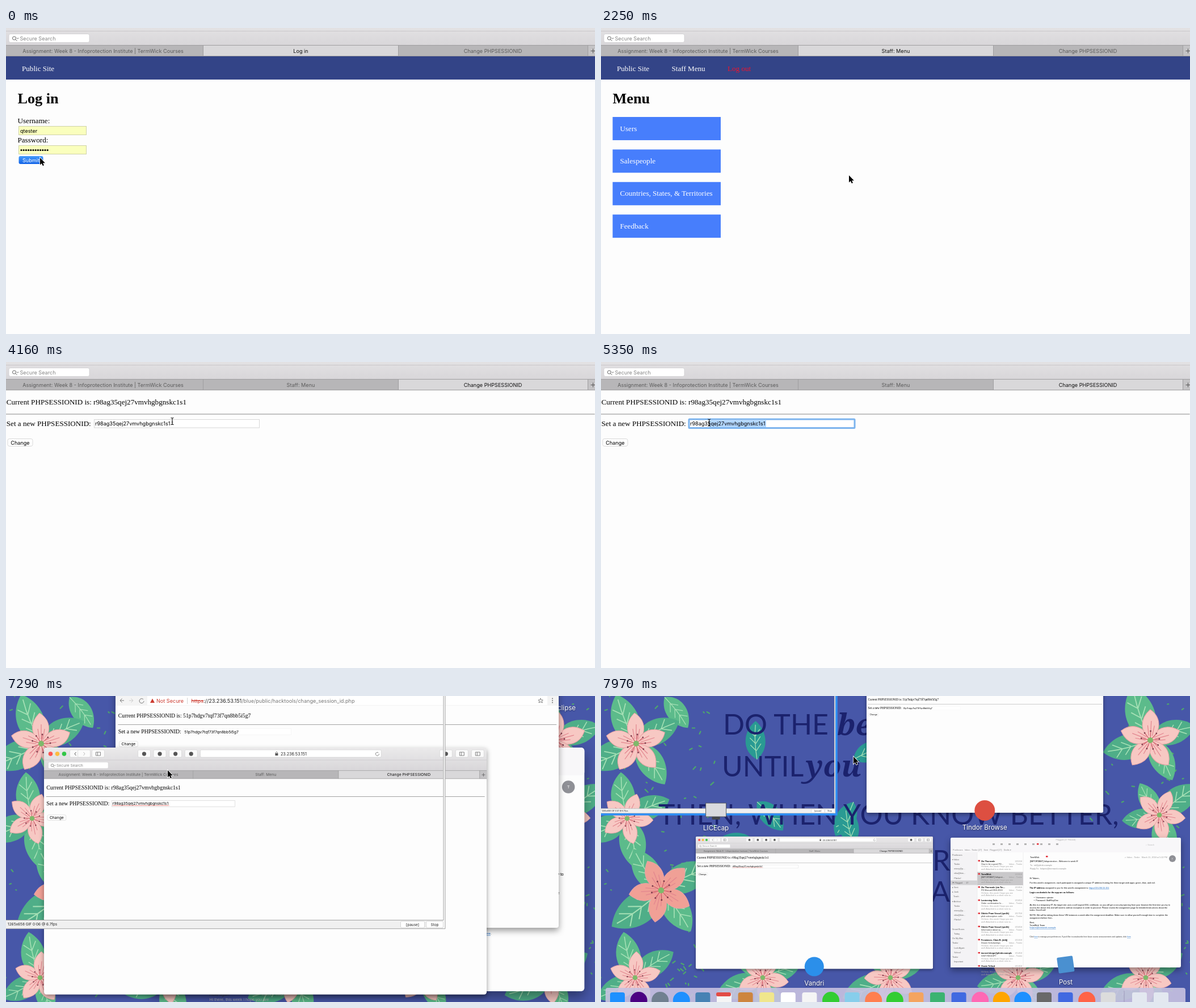
Write an HTML page that moves like this. It is 1038 px wide and 540 px high and loops after 8 s.

```html
<!DOCTYPE html>
<html lang="en">
<head>
<meta charset="utf-8">
<title>Session ID demo</title>
<style>
  html, body { margin: 0; width: 100%; height: 100%; overflow: hidden; background: #fdfdfd; }
  svg { display: block; width: 100vw; height: 100vh; }
  text { white-space: pre; }
  .serif { font: 13.12px "Liberation Serif", serif; }
  .h1 { font: bold 26.24px "Liberation Serif", serif; }
  .ui { font: 9.1px Inter, sans-serif; }
  .tiny { font: 3.75px "Liberation Sans", sans-serif; }
  .small { font: 6.5px Inter, sans-serif; }
  .label { font: 11.5px Inter, sans-serif; filter: drop-shadow(0 1px 1px #0008); }
  .letter { font: 50px Lato, sans-serif; }
  .script { font: italic bold 52px "Noto Serif", serif; }
  .shadow { filter: drop-shadow(0 5px 6px #0006); }
  .mid { text-anchor: middle; }
  .end { text-anchor: end; }
  .bold { font-weight: bold; }
  .link { fill: #1565c0; text-decoration: underline; }
</style>
</head>
<body>
<svg id="stage" viewBox="0 0 1038 540"></svg>
<script>
const LOOP = 8000;
const SESSION = 'r98ag35qej27vmvhgbgnskc1s1';

const times = (n, make) => Array.from({ length: n }, (_, i) => make(i)).join('');
const rect = (x, y, w, h, fill, more = '') =>
  `<rect x="${x}" y="${y}" width="${w}" height="${h}" fill="${fill}" ${more}/>`;
const circle = (x, y, r, fill, more = '') => `<circle cx="${x}" cy="${y}" r="${r}" fill="${fill}" ${more}/>`;
const line = (d, stroke, width = 1, more = '') =>
  `<path d="${d}" fill="none" stroke="${stroke}" stroke-width="${width}" ${more}/>`;
const text = (x, y, cls, str, fill = '#000', more = '') =>
  `<text x="${x}" y="${y}" class="${cls}" fill="${fill}" ${more}>${str}</text>`;
const group = (id, body, more = '') => `<g id="${id}" ${more}>${body}</g>`;
const link = str => `<tspan class="link">${str}</tspan>`;
const bold = str => `<tspan class="bold">${str}</tspan>`;

// ---------- browser pages ----------
const header = title => rect(0, 50, 1042, 41, '#334487') +
  text(28, 75.5, 'serif', 'Public Site', '#fff') + text(20.5, 132.5, 'h1', title);
const loginField = (y, label) => text(20.5, y, 'serif', label) +
  rect(22.5, y + 5.5, 119, 15, '#faffbd', 'stroke="#cfd2a8"');

const loginPage = header('Log in') +
  loginField(168, 'Username:') + text(25, 184.5, 'ui', 'qtester') +
  loginField(202, 'Password:') + times(12, i => circle(27 + i * 4.2, 215.5, 1.6, '#000')) +
  rect(22.5, 226, 43, 14, 'url(#blue)', 'id="submit" rx="3"') + text(44, 236.5, 'ui mid', 'Submit', '#fff');

const menuPage = header('Menu') +
  text(124.5, 75.5, 'serif', 'Staff Menu', '#fff') + text(223, 75.5, 'serif', 'Log out', '#f0142d') +
  ['Users', 'Salespeople', 'Countries, States, &amp; Territories', 'Feedback'].map((label, i) =>
    rect(20.5, 157 + i * 57.4, 190.5, 41, '#477efc') +
    text(33.5, 181.5 + i * 57.4, 'serif', label, '#fff')).join('');

const sessionPage = (id, inputWidth, inputBorder, buttonY, inputExtras = '') =>
  text(0.8, 74.8, 'serif', 'Current PHPSESSIONID is: ' + id) +
  rect(0, 91.5, 1037.5, 1, '#858585') +
  text(0.8, 112.5, 'serif', 'Set a new PHPSESSIONID:') +
  rect(155.5, 101.5, inputWidth, 14.5, '#fff', `stroke="${inputBorder}"`) + inputExtras +
  text(157, 112.2, 'ui', id) +
  rect(3, buttonY, 44, 13, '#fff', 'rx="3" stroke="#d0d0d0" stroke-width=".8"') +
  text(25, buttonY + 10, 'ui mid', 'Change');

const inputExtras =
  rect(155, 101, 292, 15.5, 'none', 'id="ring" rx="1" stroke="#7db4ee" stroke-width="3"') +
  rect(157, 103, 0, 12, '#b3d7ff', 'id="selection"');

const tabs = rect(-5, 30, 1047, 20, '#b7b6b8') +
  rect(348, 30, 344, 20, '#d9d8da', 'id="activeTab"') + rect(1025.5, 30, 17, 20, '#c4c3c5') +
  line('M-5 30.5H1042M-5 49.5H1042M347.5 30V50M691.5 30V50M1025.5 30V50', '#9f9ea0') +
  text(171, 43.5, 'ui mid', 'Assignment: Week 8 - Infoprotection Institute | TermWick Courses', '#5c5c5c') +
  text(519.5, 43.5, 'ui mid', '', '#111', 'id="tab1"') +
  text(858, 43.5, 'ui mid', 'Change PHPSESSIONID', '#5c5c5c', 'id="tab2"') +
  line('M1030.5 40.5H1038.5M1034.5 36.5V44.5', '#555');

const toolButton = (x, glyph) =>
  rect(x - 11, 95, 22, 13, '#fbfbfb', 'rx="2" stroke="#cfcfcf" stroke-width=".6"') + glyph;
const dot = x => circle(x, 102, 3.6, '#555');
const box = x => line(`M${x - 4} 99h8v6h-8zm3 0v6`, '#666', .8);
const toolbar = `<g transform="translate(-95.6 -146) scale(1.342)">` +
  ['#fc5753', '#fdbc40', '#33c748'].map((color, i) => circle(79 + i * 12, 102, 3.8, color)).join('') +
  toolButton(124, line('M124 99l-2.5 3l2.5 3', '#555')) + toolButton(138, line('M137 99l2.5 3l-2.5 3', '#bbb')) +
  toolButton(163, box(163)) + times(4, i => toolButton(244 + i * 27.6, dot(244 + i * 27.6))) +
  toolButton(776, dot(776)) + toolButton(804, box(804)) + toolButton(832, box(832)) +
  rect(343, 95, 319, 13, '#fff', 'rx="2" stroke="#ccc" stroke-width=".6"') +
  rect(475, 101, 5, 4, '#555') + line('M476 101v-1.5q1.5 -2.5 3 0v1.5', '#555', .8) +
  text(507.5, 105, 'mid', '23.236.53.151', '#222', 'style="font:7.2px Inter,sans-serif"') +
  line('M657 100a3 3 0 1 0 1 2', '#666', .8) + `</g>`;

const webWindow = rect(-5, -24, 1047, 585, '#fdfdfd', 'rx="6"') +
  `<path d="M-5 30V-18Q-5 -24 1 -24H1036Q1042 -24 1042 -18V30Z" fill="url(#barGrey)"/>` + toolbar +
  line('M-5 5.5H1042', '#c9c7ca') +
  rect(5, 10.5, 142, 15, '#fff', 'rx="3" stroke="#d0ced1" stroke-width=".8"') +
  circle(14.5, 18, 3, 'none', 'stroke="#666"') + line('M16.7 20.2l2.8 2.8M19 17.5l1.7 1.5l1.7 -1.5', '#666') +
  text(24.5, 22, 'ui', 'Secure Search', '#868686') + tabs +
  group('login', loginPage) + group('menu', menuPage) +
  group('session', sessionPage(SESSION, 291, '#d8d8d8', 135.5, inputExtras) +
    line('M157 113.2H291', '#ea4b43', 1.4, 'id="squiggle" stroke-dasharray="2 1.1"'));

// ---------- other windows ----------
const urlLine = text(265, 11.5, 'ui', '<tspan fill="#cc3b30">Not Secure</tspan>' +
  '<tspan fill="#bbb">  |  </tspan><tspan fill="#cc3b30" text-decoration="line-through">https</tspan>' +
  '://23.236.53.151<tspan fill="#777">/blue/public/hacktools/change_session_id.php</tspan>', '#222');
const secondWindow = rect(193, -60, 781, 469, '#fdfdfd', 'rx="4"') + rect(193, -60, 781, 77, '#f4f4f4') +
  rect(249, 0, 705, 16, '#fff') +
  line('M208 8h-7l3.5 -3.5m-3.5 3.5l3.5 3.5M242 6a4 4 0 1 0 1 3', '#777') +
  line('M217 8h7l-3.5 -3.5m3.5 3.5l-3.5 3.5', '#ccc') +
  `<path d="M254 12l4 -7.5l4 7.5z" fill="#cc3b30"/>` + urlLine +
  line('M942 4l1.3 3h3l-2 2l1 3l-3.3 -1.8l-3 1.8l1 -3l-2 -2h2.700z', '#666', .8) +
  times(3, i => circle(963, 4.5 + i * 3.5, .9, '#666')) +
  `<g transform="translate(197.25 -18) scale(.745)">` +
  sessionPage('51p7hdgv7tqf73f7qn8bb5i5g7', 254, '#f4f4f4', 131.5) + `</g>`;

const accounts = ['   Tindor', '   minny@p…', '   nika@bim…', '   Plimbo!'];
const folders = ['Postboxes', '▾ Inbox', ...accounts, '⚑ Flagged      17', '▸ Sent', '▸ Junk', '  Trash',
  '▾ Archive', ...accounts, '', 'Smart Boxes', '   Today', 'On My Mac', 'Tindor', '   Look Again', '   School',
  'Tindor', '   Important'];
const senders = [['Zia Thornvale', 'How to be a good PD…'], ['TermWick', '[IMPORTANT] Infoprot…'],
  ['Zia Thornvale (via Tin…', 'PD Manual 2018-2019'], ['Lanterning Gala', 'Order confirmation fo…'],
  ['Odette Pram Vossel (qrn2k)', 'pfub subscription code'], ['Odette Pram Vossel (qrn2k)', 'Information about su…'],
  ['Fennimore, Clara B. (zk4j)', 'Dearm Scholarships'], ['tavneel.dorga@plimb.example', 'VISIT RECEIPT'],
  ['Oswin Tellard', 'Hello again']];
const letter = ['Hi Talwen,', '',
  "For this week's assignment, each participant is assigned a unique IP address hosting the three target web apps: green, blue, and red.", '',
  `${bold('The IP address')} assigned to you for this week's assignment is: ${link('https://23.236.53.151')}`, '',
  bold('Login credentials for the app are as follows:'), '',
  '       •  Username: qtester', '       •  Password: StaffKeyOne', '',
  'As this is a temporary IP, the target site uses a self-signed SSL certificate, so you will get a security warning from your browser the first time you try to',
  'access the above link and will need to add an exception in order to proceed. Please review the assignment page for detailed instructions about the',
  'tasks. Good luck!', '',
  'NOTE: We will be taking down these VM instances a week after the assignment deadline. Make sure to allow yourself enough time to complete the',
  'assignment before then.', '', 'Best,', 'TermWick Team', link('helpers@termwick.example')];
const flag = (x, y) => rect(x, y, 3.5, 2.5, '#e3303a');

let letterY = 318;
const letterBody = letter.map(s => text(755.5, letterY += s ? 4.6 : 4, 'tiny', s)).join('');

const message = ([name, subject], i) => {
  const y = 292.5 + i * 23.2;
  return flag(664.5, y - 3) + text(670, y, 'tiny bold', name) + text(670, y + 5, 'tiny', subject, '#333') +
    text(670, y + 9.8, 'tiny', 'Hi there, this week I hope you are', '#999') +
    text(670, y + 14.5, 'tiny', 'well. Attached is a short note to…', '#999') +
    text(742, y, 'tiny end', `3/${21 - i}/18`, '#999') + text(742, y + 5, 'tiny end', 'Inbox - Tindor', '#999');
};
const letterWindow = rect(616, 250, 406, 229, '#fdfdfd', 'rx="3"') + rect(616, 250, 406, 26, '#f8f7f9', 'rx="3"') +
  text(819, 255, 'tiny mid', 'Flagged (17 Filtered)', '#aaa') +
  times(9, i => rect(690 + i * 14, 260, 4, 3, '#b5b5b5')) + flag(768, 260) +
  text(960, 264, 'tiny', '⌕ Search', '#bbb') +
  text(620, 273, 'tiny', 'Postboxes   Inbox - Tindor (27)   Sent   Flagged (17)   Drafts ▾', '#888') +
  rect(616, 276, 47, 203, '#f4f3f5') + rect(616, 325.5, 47, 8, '#d2d1d4') +
  folders.map((name, i) => text(619, 281.5 + i * 8.2, 'tiny', name, '#666')).join('') +
  rect(663, 310.5, 81, 23.5, '#c9c8ca') + line('M744 276V479M663 276V479', '#e2e2e2', .5) +
  senders.map(message).join('') +
  text(756, 285.5, 'tiny', 'TermWick') + flag(784, 282) +
  text(756, 292.5, 'tiny', '[IMPORTANT] Infoprotection - Welcome to week 8!') +
  text(756, 299.5, 'tiny', 'To:  tal@plimb.example', '#888') +
  text(756, 306, 'tiny', 'Reply-To:  helpers@termwick.example', '#888') +
  text(998, 285.5, 'tiny end', '▱ Inbox - Tindor   March 21, 2018 at 5:22 PM', '#999') +
  circle(1007, 287, 6, '#8f9096') + text(1007, 288.5, 'tiny mid', 'T', '#fff') + letterBody +
  text(755.5, 426, 'tiny', `Click ${link('here')} to manage post preferences. If you'd like to unsubscribe from future course announcements and updates, click ${link('here')}.`, '#333', 'style="font-size:3.2px"');

const smallButton = (x, w, label) =>
  rect(x, 397.5, w, 11.5, '#fff', 'rx="2" stroke="#c8c8c8" stroke-width=".7"') +
  text(x + w / 2, 405.5, 'small mid', label, '#222');
const recorder = line('M-40 414H777V-60', '#2f90f6', 8, 'id="highlight"') +
  rect(-40, 395, 814, 16, '#f0f0f0') + rect(770.5, -60, 3.5, 471, '#fafafa') +
  line('M-40 395.5H771V-60M-40 410.7H774V-60', '#9a9a9a', .9) +
  text(3, 405, 'small', '', '#222', 'id="counter"') +
  smallButton(695.5, 42, '[pause]') + smallButton(740.5, 30, 'Stop');

// ---------- wallpaper ----------
let seed = 7;
const random = () => (seed = seed * 16807 % 2147483647) / 2147483647;
const spin = (n, body) => times(n, i => `<g transform="rotate(${i * 360 / n})">${body}</g>`);

const defs = `<defs>
  <linearGradient id="blue" x2="0" y2="1"><stop stop-color="#459bfc"/><stop offset="1" stop-color="#1263e6"/></linearGradient>
  <linearGradient id="barGrey" x2="0" y2="1"><stop stop-color="#ebeaeb"/><stop offset="1" stop-color="#d8d6d9"/></linearGradient>
  <g id="flower">${spin(5, '<path d="M0 0C-19 -16 -21 -36 -3 -54C17 -42 20 -18 0 0" stroke="#e9a3a5"/>' +
    line('M0 -8V-34M-3 -8l-3 -18M3 -8l3 -18', '#e2868f', 1.2))}
    ${spin(9, line('M0 0l2 -15', '#c9525f') + circle(2, -16, 1.4, '#7b3b4a'))}${circle(0, 0, 5, '#7fb96b')}</g>
  <g id="leaf"><path d="M0 0C-30 -18 -26 -60 4 -80C26 -58 28 -20 0 0"/>
    ${line('M0 0Q-3 -40 3 -72' + times(3, i => `M0 ${-18 - i * 15}l-11 -13m11 13l11 -14`), '#a5e0b5', 1.5)}</g></defs>`;
const stamp = (shape, x, y, turn, scale, fill) =>
  `<use href="#${shape}" fill="${fill}" transform="translate(${x} ${y}) rotate(${turn}) scale(${scale})"/>`;

const PINK = '#f7c8c3', CORAL = '#f0a096';
const sideFlowers = [[62, 84, 1, PINK], [46, 216, .85, PINK], [106, 343, 1.05, CORAL]];
const flowers = [...sideFlowers, ...sideFlowers.map(([x, y, s, c]) => [1030 - x, y - 6, s, c])];
for (let x = 60; x < 1038; x += 225) flowers.push([x, 497, .85, PINK]);

const leavesAround = ([x, y, size]) => times(4, i =>
  stamp('leaf', x, y, 50 + i * 90 + random() * 30, size * (.95 + random() * .4), i % 2 ? '#5cbb8b' : '#4fae88'));
const specks = times(150, i =>
  `M${random() * 200 + (i % 2) * 850} ${random() * 540}l${random() * 10 - 5} ${random() * 10 - 5}`);

const wallpaper = rect(0, 0, 1038, 540, '#4757a8') +
  line(specks, '#4da86b', 2.2, 'stroke-linecap="round"') +
  times(8, i => stamp('leaf', 275 + (i % 2) * 170, 112 + (i >> 1) * 75, i * 70 - 5, .85, '#2a9a93')) +
  stamp('leaf', 112, 2, 140, .85, '#5cbb8b') + flowers.map(leavesAround).join('') +
  flowers.map(([x, y, size, color], i) => stamp('flower', x, y, i * 25, size, color)).join('') +
  `<g fill="#1b226d">` +
  [['letter', 215, 68, 'DO THE'], ['script', 416, 69, 'best'], ['letter', 213, 142, 'UNTIL'], ['script', 361, 142, 'you'],
    ['letter', 101, 227, 'THEN, WHEN YOU KNOW BETTER,'], ['letter', 584, 308, 'R'], ['letter', 581, 363, 'A']]
    .map(([cls, x, y, str]) => text(x, y, cls, str, 'inherit')).join('') + `</g>`;

// ---------- dock; a star marks a round icon ----------
const dockIcons = ('dodgerblue indigo* slategray* dodgerblue* steelblue whitesmoke peru khaki white whitesmoke limegreen* ' +
  'skyblue coral* limegreen* sandybrown mediumseagreen royalblue hotpink* orange* dodgerblue* dimgray royalblue tomato* ' +
  'gainsboro').split(' ');
const dock = rect(8, 515, 1022, 60, '#c8c3e2', 'rx="4" opacity=".9"') + line('M922 520V540', '#9b97b8') +
  dockIcons.map((icon, i) => {
    const x = 29 + i * 37.6, color = icon.replace('*', '');
    return icon.endsWith('*') ? circle(x, 537, 15, color) : rect(x - 13, 523, 26, 28, color, 'rx="4"');
  }).join('') + times(2, i => rect(936 + i * 38, 523, 26, 28, '#e3e8f0', 'rx="3"')) +
  rect(203, 523, 26, 7, '#e24b45', 'rx="3"');

// ---------- overview windows ----------
// anchor: point inside the window; from / to: [x, y, scale] of that point; foot: where the app badge sits.
const windows = {
  letterWin: { anchor: [616, 250], from: [257, 91, 1.8776], to: [616, 250, 1], foot: [819, 479],
    name: 'Post', icon: rect(-14, -15, 28, 28, '#4a90d0', 'rx="2" transform="rotate(-8)"') },
  secondWin: { anchor: [193, 409], from: [193, 409, 1], to: [468, 206, .534], foot: [583, 409],
    name: 'Tindor Browse', icon: circle(0, 0, 18, '#dd4f41') },
  webWin: { anchor: [-5, -24], from: [67, 91, .745], to: [167, 248, .3992], foot: [518, 561],
    name: 'Vandri', icon: circle(0, 0, 17, '#2b8fea') },
  recorderWin: { anchor: [774, 411], from: [774, 411, 1], to: [413, 207, .534], foot: [380, 411],
    name: 'LICEcap', icon: rect(-18, -14, 36, 24, '#d9dade', 'stroke="#55585e"') + rect(-7, 10, 14, 5, '#44474c') }
};
const badges = Object.entries(windows).map(([id, { name, icon }]) =>
  group(id + 'Badge', icon + text(0, 33.5, 'label mid', name, '#fff'))).join('');

document.getElementById('stage').innerHTML = defs +
  group('desk', wallpaper + text(972, 25, 'label', 'clipse', '#fff', 'id="desktopLabel"') +
    group('letterWin', letterWindow, 'class="shadow"') + group('secondWin', secondWindow, 'class="shadow"')) +
  group('webWin', webWindow) +
  group('front', group('recorderWin', recorder) + group('overlay', group('dock', dock) + badges)) +
  group('arrow', '<path d="M0 0V12.600l2.900 -2.700l2 4.300l2 -.9l-1.900 -4.100h3.900z" stroke="#fff" stroke-width="1.600" paint-order="stroke"/>') +
  group('beam', line('M-2.5 -6Q0 -6 0 -4.5V4.5Q0 6 -2.5 6M2.5 -6Q0 -6 0 -4.5M0 4.5Q0 6 2.5 6M-1.2 1.5H1.2', '#111', 1.1));

// ---------- motion ----------
const STEP = 147, OVERVIEW = 7290;
const $ = id => document.getElementById(id);
const show = (id, on) => $(id).style.display = on ? '' : 'none';
const mix = (a, b, p) => a.map((v, i) => v + (b[i] - v) * p);

// Pointer journeys: first change, last change, destination.
const journeys = [
  [0, 0, [60, 229]], [150, 470, [300, 299]],
  [1370, 1810, [243, 82]], [1957, 2250, [437, 260]],
  [2550, 3433, [694, 38]],
  [3720, 3867, [310, 157]], [4015, 4160, [293, 104.5]],
  [4610, 4760, [318, 107]], [4907, 5650, [127, 107]],
  [5950, 6100, [292, 154]],
  [OVERVIEW, OVERVIEW, [285, 131]], [7430, 7430, [278, 105]], [7610, 7970, [445, 107]]];

function pointerAt(t) {
  const i = journeys.findLastIndex(([start]) => t >= start);
  const [start, end, goal] = journeys[i];
  const steps = Math.round((end - start) / STEP);
  const p = Math.min(1, (Math.floor((t - start + 8) / STEP) + 1) / (steps + 1));
  return mix(journeys[Math.max(0, i - 1)][2], goal, p);
}

function drawOverview(t) {
  const shown = Math.floor((t - OVERVIEW) / 140) * 140;
  const p = 1 - (1 - Math.min(1, shown / 233)) ** 2;
  for (const [id, { anchor, from, to, foot }] of Object.entries(windows)) {
    const [x, y, scale] = mix(from, to, p);
    $(id).setAttribute('transform', `translate(${x} ${y}) scale(${scale}) translate(${-anchor[0]} ${-anchor[1]})`);
    const badge = $(id + 'Badge');
    badge.setAttribute('transform',
      `translate(${x + (foot[0] - anchor[0]) * scale} ${y + (foot[1] - anchor[1]) * scale - 4})`);
    badge.lastChild.setAttribute('opacity', Math.max(0, (p - .7) / .3));
  }
  show('overlay', p > .5);
  show('desktopLabel', p < .5);
  show('highlight', t >= 7790);
  $('dock').setAttribute('transform', `translate(0 ${25 * (1 - p)})`);
  $('counter').textContent = `1265x658 GIF 0:0${p < .5 ? 6 : 7} @ 6.7fps`;
}

function drawBrowser(t, pointerX) {
  const loggedIn = t >= 305, onSession = t >= 3425, focused = t >= 4302 && t < 6400;
  show('login', !loggedIn);
  show('menu', loggedIn && !onSession);
  show('session', onSession);
  $('submit').style.filter = t >= 150 ? 'brightness(.8)' : '';
  $('tab1').textContent = loggedIn ? 'Staff: Menu' : 'Log in';
  $('tab1').setAttribute('fill', onSession ? '#5c5c5c' : '#111');
  $('tab2').setAttribute('fill', onSession ? '#111' : '#5c5c5c');
  $('activeTab').setAttribute('x', onSession ? 692 : 348);
  $('activeTab').setAttribute('width', onSession ? 333 : 344);
  show('ring', focused);
  show('squiggle', t >= 6540);
  show('selection', focused && t >= 4907);
  const left = t < 5650 ? Math.min(291, Math.max(157, pointerX)) : 157;
  $('selection').setAttribute('x', left);
  $('selection').setAttribute('width', 291 - left);
}

function draw(t) {
  const inOverview = t >= OVERVIEW, typing = t >= 4152 && t < 5950;
  const [x, y] = pointerAt(t);
  show('desk', inOverview);
  show('front', inOverview);
  $('webWin').setAttribute('class', inOverview ? 'shadow' : '');
  if (inOverview) drawOverview(t);
  else $('webWin').removeAttribute('transform');
  drawBrowser(t, x);
  show('arrow', !typing);
  show('beam', typing);
  $(typing ? 'beam' : 'arrow').setAttribute('transform', `translate(${x} ${y})`);
}

const begin = performance.now();
function tick() {
  draw((performance.now() - begin) % LOOP);
  requestAnimationFrame(tick);
}
tick();
</script>
</body>
</html>
```
